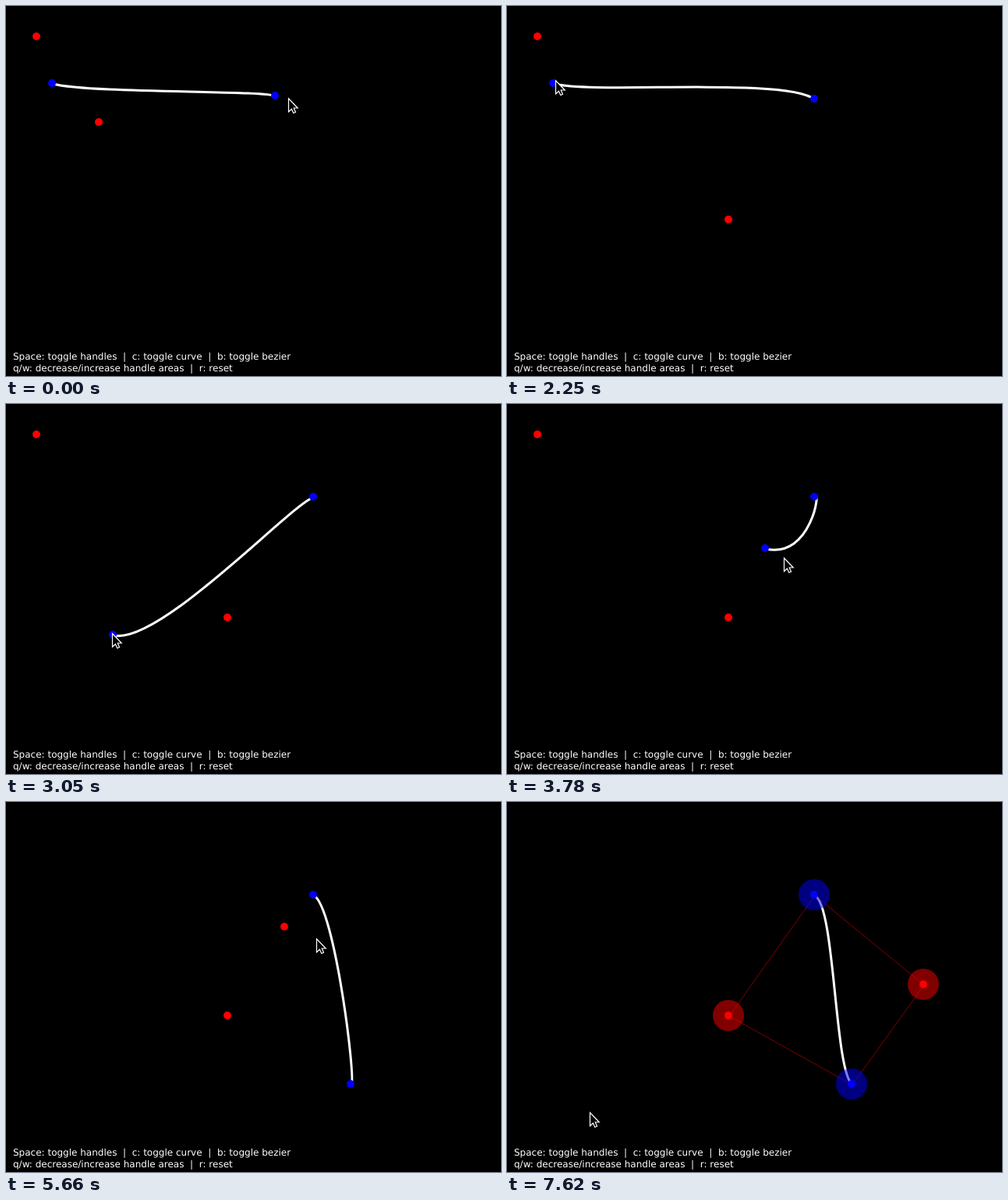
An HTML page that plays this animation: 635x475 px, repeating every 8 s.

```html
<!DOCTYPE html>
<html lang="en">
<head>
<meta charset="utf-8">
<title>Curve handles</title>
<style>
  html, body { margin: 0; width: 100%; height: 100%; overflow: hidden; background: #000; }
  svg { display: block; width: 635px; height: 475px; }
  text {
    font: 12px "DejaVu Sans", sans-serif; fill: #fff; white-space: pre;
    text-rendering: geometricPrecision;
  }
  .red { fill: #f00; }
  .blue { fill: #00f; }
</style>
</head>
<body>
<svg viewBox="0 0 635 475">
  <rect width="635" height="475"/>
  <path id="curve" fill="none" stroke="#fff" stroke-width="3"/>
  <g id="extras">
    <path id="frame" fill="none" stroke="#f00" stroke-opacity=".5"/>
    <g id="areas" fill-opacity=".5"></g>
  </g>
  <g id="dots"></g>
  <text x="9" y="454">Space: toggle handles  |  c: toggle curve  |  b: toggle bezier</text>
  <text x="9" y="469">q/w: decrease/increase handle areas  |  r: reset</text>
  <path id="cursor" d="M.5 .8V17.8L4.4 14.2L6.8 19.5L9.5 18.3L7.2 13H12.2Z" stroke="#fff" stroke-width="1.2"/>
</svg>
<script>
const LOOP = 8000, LAG = 55, HANDLES_AT = 7620;
const $ = id => document.getElementById(id);

const smooth = u => u * u * (3 - 2 * u);
const speedUp = u => u * u;
const slowDown = u => u * (2 - u);

// Pointer strokes: begin, end, x, y, sideways bow, easing
const origin = [344, 113];
const strokes = [
  [-55, 80, 393, 117, 4, smooth],
  [220, 780, 118, 147, -55, smooth],
  [930, 1100, 283, 272, 20, speedUp],
  [1100, 1260, 492, 297, 0, slowDown],
  [1260, 1840, 66, 93, 0, smooth],
  [2075, 2085, 62, 95, 0, smooth],
  [2250, 2990, 136, 294, -15, smooth],
  [3230, 4180, 441, 360, -150, smooth],
  [4390, 4530, 38, 75, 0, smooth],
  [4580, 5110, 38, 38, -18, smooth],
  [5310, 6050, 533, 232, -5, slowDown],
  [6140, 6640, 2, 405, 0, smooth],
  [6640, 6930, 68, 444, 0, smooth],
  [7040, 7330, 106, 398, 0, smooth]
];

// Each point has a home and one drag from grab to drop
const points = [
  { color: 'red', home: [40, 40], grab: 5310, drop: 6130 },
  { color: 'blue', home: [60, 100], grab: 2250, drop: 4370 },
  { color: 'blue', home: [346, 116], grab: -55, drop: 220 },
  { color: 'red', home: [120, 150], grab: 930, drop: 1100 }
];

function pointerAt(t) {
  let [x, y] = origin;
  for (const [begin, end, toX, toY, bow, ease] of strokes) {
    if (t < begin) break;
    const u = ease(Math.min(1, (t - begin) / (end - begin)));
    const dx = toX - x, dy = toY - y;
    const side = 4 * u * (1 - u) * bow / Math.hypot(dx, dy);
    x += dx * u - dy * side;
    y += dy * u + dx * side;
    if (t < end) break;
  }
  return [Math.round(x), Math.round(y)];
}

// A dragged point trails the pointer by one redraw
function placeOf(point, t) {
  if (t - LAG < point.grab) return point.home;
  const [x, y] = pointerAt(Math.min(t - LAG, point.drop));
  return [x + 2, y + 3];
}

function addCircle(parent, color, r) {
  const c = document.createElementNS('http://www.w3.org/2000/svg', 'circle');
  c.setAttribute('class', color);
  c.setAttribute('r', r);
  return $(parent).appendChild(c);
}

for (const p of points) {
  p.marks = [addCircle('areas', p.color, 20), addCircle('dots', p.color, 5)];
}

function draw(t) {
  const [c, a, b, d] = points.map(p => placeOf(p, t));
  [c, a, b, d].forEach(([x, y], i) => {
    // Circles sit one pixel up and left of the line work
    for (const m of points[i].marks) {
      m.setAttribute('cx', x - 1);
      m.setAttribute('cy', y - 1);
    }
  });
  // Catmull-Rom span from a to b, written as a cubic Bezier
  const out = a.map((v, i) => v + (b[i] - c[i]) / 6);
  const into = b.map((v, i) => v - (d[i] - a[i]) / 6);
  $('curve').setAttribute('d', `M${a}C${out} ${into} ${b}`);
  $('frame').setAttribute('d', `M${a}L${c}L${b}L${d}Z`);
  $('extras').style.display = t >= HANDLES_AT ? '' : 'none';
  $('cursor').setAttribute('transform', `translate(${pointerAt(t)})`);
}

const began = performance.now();
function loop() {
  draw((performance.now() - began) % LOOP);
  requestAnimationFrame(loop);
}
loop();
</script>
</body>
</html>
```
